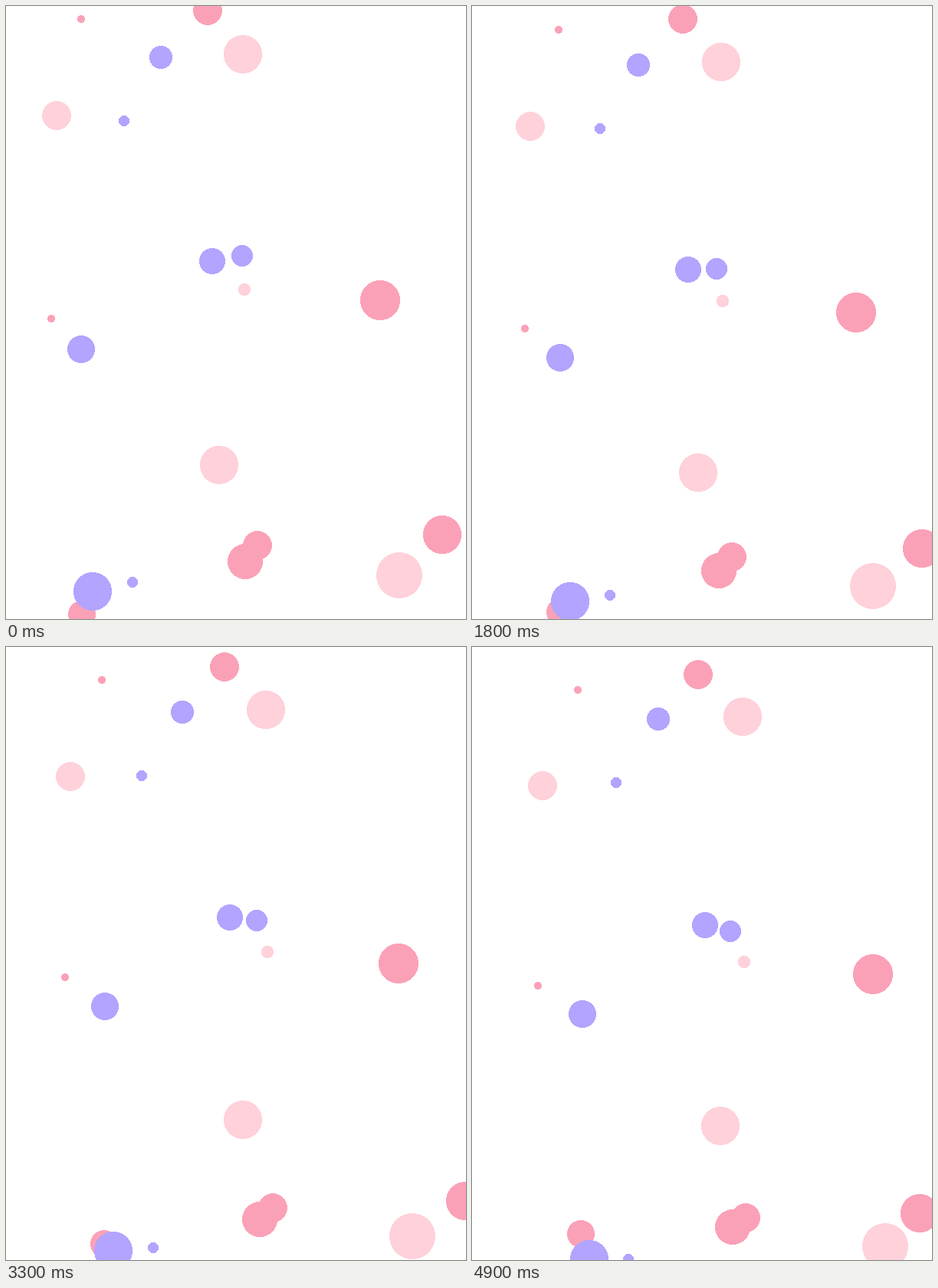
These frames come from a looping animation (600x800 px, 5 s). An HTML page with a canvas:

```html
<!DOCTYPE html>
<html lang="en">
<head>
<meta charset="utf-8">
<title>Drifting dots</title>
<style>
  html, body { margin: 0; width: 100%; height: 100%; overflow: hidden; background: #fff; }
  canvas { display: block; }
</style>
</head>
<body>
<canvas id="stage" width="600" height="800"></canvas>
<script>
const W = 600, H = 800, STEP = 100, STEPS = 50;
const ctx = document.getElementById('stage').getContext('2d');

const PINK = '#fba1b7', PALE = '#ffd1da', VIOLET = '#b2a4ff';

// colour, radius, start x, start y, x speed, y speed (pixels per step)
const dots = [
  [PINK, 5, 98.2, 17.2, .81, .79],
  [PINK, 19, 263, 6.15, .655, .6],
  [PALE, 25, 309.3, 62.95, .89, .565],
  [VIOLET, 15, 202.3, 67, .84, .55],
  [PALE, 19, 66.25, 143.2, .53, .78],
  [VIOLET, 7, 154, 150, .7, .55],
  [VIOLET, 17, 268.95, 333.05, .71, .605],
  [VIOLET, 14, 307.9, 326.2, .59, .92],
  [PALE, 8, 311.3, 370.1, .89, .84],
  [PINK, 26, 488, 383.9, .72, .875],
  [PINK, 5, 59.1, 408.1, .555, .695],
  [VIOLET, 18, 98.1, 448.3, .94, .62],
  [PALE, 25, 278.1, 599.1, .94, .535],
  [PINK, 19, 328, 704.1, .595, .84],
  [PINK, 23, 311.9, 725, .57, .655],
  [PINK, 25, 569.3, 690, .96, 1],
  [PALE, 30, 513, 743, .53, .795],
  [PINK, 18, 99.2, 794.35, .88, .81],
  [VIOLET, 25, 113.1, 764.1, .815, .72],
  [VIOLET, 7, 165.1, 752.1, .8, .965]
];

// The centre bounces off the far edge.
const bounce = (p, max) => Math.round(p > max ? 2 * max - p : p);

// Hard-edged disc, one row of pixels at a time.
function disc(color, r, cx, cy) {
  ctx.fillStyle = color;
  for (let row = -r; row < r; row++) {
    const dy = row + .5;
    const half = Math.round(Math.sqrt(r * r - dy * dy));
    ctx.fillRect(cx - half, cy + row, 2 * half, 1);
  }
}

function draw(n) {
  ctx.fillStyle = '#fff';
  ctx.fillRect(0, 0, W, H);
  for (const [color, r, x, y, vx, vy] of dots) {
    disc(color, r, bounce(x + vx * n, W), bounce(y + vy * n, H));
  }
}

const start = performance.now();
function tick() {
  const t = performance.now() - start;
  draw(Math.floor(t / STEP) % STEPS);
  requestAnimationFrame(tick);
}
tick();
</script>
</body>
</html>
```
